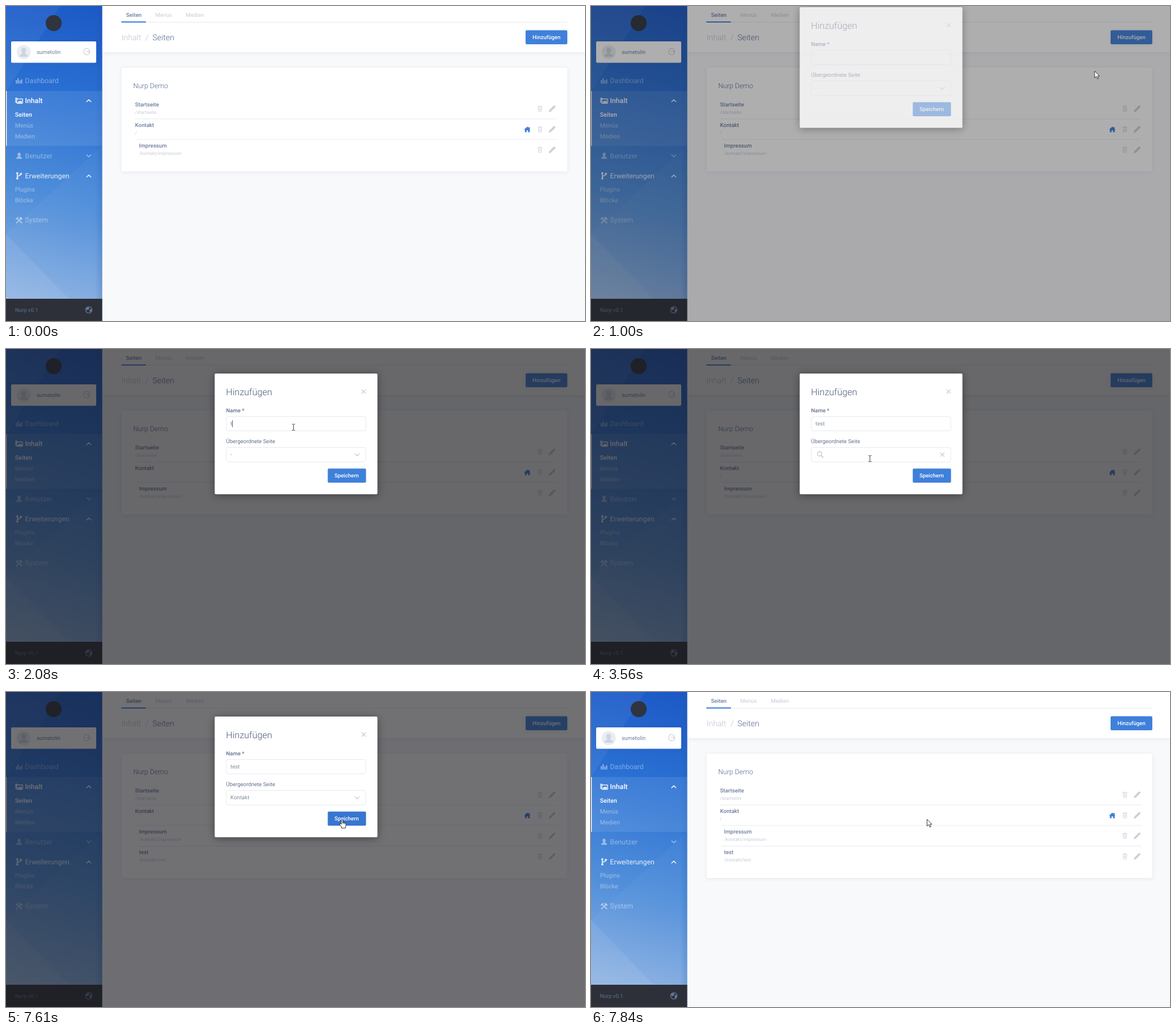
These frames come from a looping animation (1014x552 px, 8000 ms). An HTML page:

```html
<!DOCTYPE html>
<html lang="de">
<head>
<meta charset="utf-8">
<title>Seite hinzufügen</title>
<style>
  html, body { margin: 0; width: 100%; height: 100%; overflow: hidden; background: #f8f9fb; }
  svg { display: block; width: 1014px; height: 552px; }
  text { font-family: Roboto, "Noto Sans", sans-serif; text-rendering: geometricPrecision; white-space: pre; }
  .line { fill: none; stroke-linecap: round; stroke-linejoin: round; }
  .soft { filter: drop-shadow(0 1px 3px rgba(40, 60, 110, .1)); }
  .lift { filter: drop-shadow(0 2px 7px rgba(0, 0, 0, .4)); }
</style>
</head>
<body>
<svg id="stage" viewBox="0 0 1014 552" xmlns="http://www.w3.org/2000/svg"></svg>
<script>
const LOOP = 8000;
const BLUE = '#3f80da', HOVER = '#3876cf', INK = '#6c7e9f', PALE = '#c6ccd8', LINE = '#e7eaf0';

// ---- drawing helpers
const text = (x, y, size, fill, str, weight = 400, id = '') =>
  `<text ${id && `id="${id}"`} x="${x}" y="${y}" font-size="${size}" fill="${fill}" font-weight="${weight}">${str}</text>`;
const rect = (x, y, w, h, fill, r = 0, extra = '') =>
  `<rect x="${x}" y="${y}" width="${w}" height="${h}" rx="${r}" fill="${fill}" ${extra}/>`;
const line = (d, stroke, width = 1, extra = '') =>
  `<path class="line" d="${d}" stroke="${stroke}" stroke-width="${width}" ${extra}/>`;
const shape = (d, fill) => `<path d="${d}" fill="${fill}"/>`;
const at = (x, y, body, extra = '') => `<g transform="translate(${x} ${y})" ${extra}>${body}</g>`;
const chevron = (x, y, dir, stroke, w = 1.5) => at(x, y, line(`M-3.7 ${dir * -1.8}L0 ${dir * 1.8}L3.7 ${dir * -1.8}`, stroke, w));
const cross = (x, y) => at(x, y, line('M-3.4-3.4L3.4 3.4M3.4-3.4L-3.4 3.4', '#c0c6d1', 1.1));

// ---- icons, centred on 0,0
const person = fill => shape('M0-5.4C2-5.4 3-4 2.8-2C2.6-.4 1.9.5 1.5 1C1.6 2.3 5.3 2.4 5.3 5.4H-5.3C-5.3 2.4-1.6 2.3-1.5 1C-1.9.5-2.6-.4-2.8-2C-3-4-2-5.4 0-5.4Z', fill);
const bars = fill => shape('M-6-1h2.2v4.4h-2.2zM-2.9-4.6h2.2v8h-2.2zM.3-.6h2.2v4h-2.2zM3.4-2.4h2.2v5.8h-2.2zM-6 3.8h11.8v1h-11.8z', fill);
const photos = line('M-4-2.6V-4.6H-6V3H-4', '#fff', 1.2) + rect(-4, -3.2, 10, 7.8, 'none', .8, 'stroke="#fff" stroke-width="1.3"') +
  shape('M-3 3.6L0 0L1.6 1.6L3.2-.6L5.3 3.6Z', '#fff');
const branch = line('M-3.2-3.5V4M-3.2 2C-3 0 3-.2 3-3', '#e6eefb', 1.7) +
  [[-3.2, -4.4], [-3.2, 4.6], [3.2, -3.4]].map(([x, y]) => `<circle cx="${x}" cy="${y}" r="1.9" fill="#e6eefb"/>`).join('');
const tools = fill => line('M-4.4 4.6L3.6-3.4M4.6 4.6L-2-2', fill, 2.1) + line('M2-4.8L4.8-2M-5-2.2L-2-4.6', fill, 2.4);
const globe = '<circle r="5.6" fill="none" stroke="#64789b" stroke-width="1.2"/>' +
  shape('M-4-3.6L0-5L1.2-2.4L-1 0L-3 .4L-4.8-1ZM1.6-.6L4.6-2L5.2 1.4L2.6 4.8L1.4 2Z', '#64789b');
const exit = line('M4.9-2.8A5.6 5.6 0 1 0 4.9 2.8M-1.4 0H5.4M3.4-2L5.4 0L3.4 2', '#c9cfda', 1.1);
const trash = line('M-3.8-3.4H3.8M-1.4-3.6V-4.8H1.4V-3.6M-2.9-3.2L-2.6 4.8H2.6L2.9-3.2M-.9-1V2.8M.9-1V2.8', '#d3d7df', 1);
const pencil = shape('M-6 6L-5.2 2.6L2.6-5.2Q3.8-6.4 5-5.2L5.4-4.8Q6.4-3.8 5.2-2.6L-2.6 5.2Z', '#ccd1da');
const home = shape('M0-5L2.4-2.8V-4.4H4V-1.4L5.6 .2H4.3V5H1.3V1.6H-1.3V5H-4.3V.2H-5.6Z', BLUE);
const lens = '<circle cx="-1.2" cy="-1.2" r="3.7" fill="none" stroke="#b4bcca" stroke-width="1.1"/>' + line('M1.6 1.6L5 5', '#b4bcca', 1.2);

// ---- sidebar
const menu = [[135.3, 'Dashboard', .42, 400], [170.3, 'Inhalt', 1, 500], [266.6, 'Benutzer', .42, 400],
  [302.3, 'Erweiterungen', .87, 400], [379.4, 'System', .42, 400]];
const subs = [[193.7, 'Seiten', 1, 500], [212.8, 'Menüs', .45, 400], [231.8, 'Medien', .45, 400],
  [325.4, 'Plugins', .45, 400], [344.4, 'Blöcke', .45, 400]];
const white = a => `rgba(255,255,255,${a})`;
const entries = (list, x, size) => list.map(([y, s, a, w]) => text(x, y, size, white(a), s, w)).join('');

const sidebar = rect(0, 0, 168.5, 552, 'url(#sky)') +
  shape('M0 0H95L0 150Z', white(.05)) + shape('M0 400L168 245V513H0Z', white(.03)) +
  shape('M0 400L110 513H0Z', white(.07)) + rect(156, 0, 12.5, 513, 'url(#edge)') +
  '<circle cx="83.5" cy="30" r="14" fill="#2f343e"/>' +
  rect(9, 62, 149, 37.5, '#fff', 2, 'class="soft"') +
  '<circle cx="31" cy="80.7" r="12.3" fill="#e9ecf1"/>' + at(31, 81, person('#cbd2de'), 'opacity=".9"').replace('81)', '81) scale(1.45)') +
  text(53.7, 83.5, 9.5, INK, 'sumetolin') + at(141.5, 80, exit) +
  rect(0, 149, 168.5, 96, white(.09)) + rect(0, 149, 1.3, 96, '#fff') +
  entries(menu, 33.3, 12.2) + entries(subs, 15.7, 10.6) +
  at(23, 131, bars(white(.45))) + at(23, 166, photos) + at(23, 262.3, person(white(.45))) +
  at(23, 297.5, branch) + at(23, 375.5, tools(white(.45))) +
  chevron(145, 166, -1, '#fff') + chevron(145, 262.5, 1, white(.5)) + chevron(145, 298, -1, white(.9)) +
  rect(0, 513, 168.5, 39, '#2d3038') + text(15.7, 536, 9.5, '#5b6f92', 'Nurp v0.1') + at(145, 532.5, globe);

// ---- page
const row = (i, x, name, path, isHome) => {
  const y = 180 + i * 36;
  return (i ? rect(i > 1 ? 229 : 226, y - 18.6, (i > 1 ? 735 : 738), 1, LINE) : '') +
    text(x, y - 4, 9.6, INK, name, 500) + text(x, y + 9.4, 8.1, PALE, path) +
    (isHome ? at(913, y + .3, home) : '') + at(935, y, trash) + at(956.5, y, pencil);
};
const page = rect(168, 0, 846, 552, '#f8f9fb') +
  rect(168, -5, 846, 86, '#fff', 0, 'class="soft"') +
  rect(202, 28, 781, 1, LINE) + rect(202, 27, 43, 2, BLUE) +
  text(210.3, 18.6, 9.6, INK, 'Seiten', 500) + text(261.5, 18.6, 9.6, PALE, 'Menüs') + text(315, 18.6, 9.6, PALE, 'Medien') +
  text(202.3, 60, 14.1, '#bcc4d2', 'Inhalt', 300) + text(244.3, 60, 14.1, '#bcc4d2', '/', 300) + text(256.5, 60, 14.1, '#516891', 'Seiten', 300) +
  rect(910, 42.5, 73, 24.5, BLUE, 2, 'id="add" class="soft"') + text(922, 58, 9.5, '#fff', 'Hinzufügen', 500) +
  rect(202.5, 108, 780.5, 182, '#fff', 2, 'id="card" class="soft"') +
  text(222.8, 144.2, 12.2, '#516891', 'Nurp Demo', 300) +
  row(0, 226, 'Startseite', '/startseite') + row(1, 226, 'Kontakt', '/', true) +
  row(2, 233, 'Impressum', '/kontakt/impressum') + `<g id="added">${row(3, 233, 'test', '/kontakt/test')}</g>`;

// ---- dialog
const border = `stroke="${LINE}" stroke-width="1"`;
const dialog = rect(365.5, 43, 285, 211.5, '#fff', 2, 'class="lift"') + '<g id="content">' +
  text(385.3, 81, 16.1, '#4b5a78', 'Hinzufügen', 300) + cross(626.3, 74.5) +
  text(385.5, 111, 9.5, '#62718f', 'Name *', 500) + rect(385.8, 118.5, 244.2, 25, '#fff', 3, border) +
  text(393, 134.3, 9.6, '#838b99', '', 400, 'name') +
  text(385.5, 165.2, 9.5, '#62718f', 'Übergeordnete Seite') +
  rect(563.5, 209.5, 67, 24.7, BLUE, 2, 'id="save"') + text(575.2, 225.2, 9.5, '#fff', 'Speichern', 500) +
  rect(385.8, 172.5, 244.2, 25.5, '#fff', 3, border + ' id="box"') +
  `<g id="closed">${text(393, 188.3, 9.6, '#838b99', '-', 400, 'parent')}${chevron(615, 185.5, 1, '#bcc3cf', 1.1)}</g>` +
  `<g id="open">${at(401.5, 185, lens)}${cross(615.3, 185)}${text(413, 188.3, 9.7, '#838b99', '', 400, 'query')}</g>` +
  `<g id="results">${rect(393, 198, 230, 1, LINE)}${rect(393, 202, 230, 24, '#f3f6fb', 2, 'id="pick"')}${text(398.3, 217.5, 9.6, '#7088b2', 'Kontakt')}</g>` +
  rect(0, 0, 1, 12, '#4b5566', 0, 'id="caret"') + '</g>';

const cursors = {
  arrow: `<path d="M0 0V12L2.9 9.4L4.9 13.8L6.8 13L4.9 8.8H8.6Z" fill="#fff" stroke="#222" stroke-width=".9"/>`,
  hand: `<path d="M-1.3 1Q0-.8 1.3 1V5.4L6 6.4Q7.4 6.8 7.2 8.4L6.2 13V15.4H-1V13.2L-4.4 9Q-4.6 7-2.6 7.6L-1.3 8.8Z" fill="#fff" stroke="#222" stroke-width=".9"/>` +
    line('M1.3 5.4V8M3.4 6V8.2M5.4 6.4V8.6', '#222', .7),
  beam: line('M-2.4-5.2H-.7L0-4.6L.7-5.2H2.4M0-4.6V4.8M-2.4 5.4H-.7L0 4.8L.7 5.4H2.4', '#444', 1)
};

document.getElementById('stage').innerHTML = `<defs>
  <linearGradient id="sky" gradientUnits="userSpaceOnUse" x1="150" y1="0" x2="10" y2="520">
    <stop offset="0" stop-color="#1c59c6"/><stop offset=".3" stop-color="#2a70d3"/>
    <stop offset=".65" stop-color="#518fda"/><stop offset="1" stop-color="#90b3e2"/></linearGradient>
  <linearGradient id="edge"><stop offset="0" stop-color="#1c4f9c" stop-opacity="0"/><stop offset="1" stop-color="#1c4f9c" stop-opacity=".2"/></linearGradient>
  </defs>${page}${sidebar}${rect(0, 0, 1014, 552, '#17181c', 0, 'id="shade"')}<g id="dialog">${dialog}</g><g id="mouse">` +
  Object.entries(cursors).map(([k, v]) => `<g id="${k}">${v}</g>`).join('') + '</g>';

// ---- timing: the picture changes only at these moments
const spread = (a, b, n) => Array.from({ length: n }, (_, i) => Math.round((a + (b - a) * i / (n - 1)) / 10) * 10);
const steps = [0, ...spread(70, 830, 11), 910, ...spread(1000, 1610, 9), 1780, 2080, 2170, 2400, ...spread(2580, 2870, 5),
  ...spread(3030, 3260, 4), 3410, 3560, 3730, 3880, 4280, 4750, 5070, 5220, 5450, 6000, 6300, 6370,
  ...spread(6540, 7240, 10), 7610, 7690, 7770, 7840];

const shadeKeys = [[830, 0], [910, .1], [1000, .35], [1080, .52], [1160, .61], [1240, .65], [7600, .65], [7610, .61], [7690, .38], [7770, .14], [7840, 0]];
const fadeKeys = [[830, 0], [910, .25], [1000, .8], [1080, 1], [7610, 1], [7690, .65], [7770, .2], [7840, 0]];
const inkKeys = [[910, .3], [1000, .52], [1160, .92], [1240, 1]];
const slideKeys = [[910, -60], [1000, -41], [1080, -24], [1240, -6], [1400, 0], [7610, 0], [7690, -14], [7840, -60]];
const mouseKeys = [[70, 985, 392], [300, 978, 240], [530, 958, 110], [680, 946, 66], [750, 943, 58], [910, 943, 58],
  [1000, 882, 114], [1240, 650, 150], [1500, 515, 140], [1610, 503.5, 137], [2580, 503.5, 137], [2720, 496, 160],
  [2870, 486, 186], [3260, 486, 204], [3410, 487, 198], [3560, 488.5, 192], [3870, 488.5, 192], [3880, 489.5, 192],
  [6230, 489.5, 192], [6300, 489, 203], [6370, 488, 208], [6620, 488, 208], [6850, 530, 214], [7090, 584, 223], [7160, 588.5, 223]];
const kinds = [[0, 'arrow'], [750, 'hand'], [1000, 'arrow'], [1480, 'beam'], [2720, 'arrow'], [2800, 'hand'],
  [3410, 'beam'], [6300, 'hand'], [6700, 'arrow'], [7010, 'hand'], [7840, 'arrow']];
const names = [[0, ''], [2080, 't'], [2170, 'te'], [2400, 'tes'], [2580, 'test']];
const queries = [[0, ''], [5070, 'k'], [5220, 'ko'], [5450, 'kon']];
const carets = [[0, 0], [1780, 1], [3030, 0], [3730, 1], [4280, 0], [4750, 1], [6000, 0]];

const last = (keys, t) => keys.filter(k => k[0] <= t).pop()[1];
const track = (keys, t, c = 1) => {
  const i = keys.findIndex(k => k[0] > t);
  if (i < 0) return keys[keys.length - 1][c];
  if (!i) return keys[0][c];
  const a = keys[i - 1], b = keys[i];
  return a[c] + (b[c] - a[c]) * (t - a[0]) / (b[0] - a[0]);
};

const $ = id => document.getElementById(id);
const show = (id, on) => $(id).setAttribute('display', on ? 'inline' : 'none');
const set = (id, attr, v) => $(id).setAttribute(attr, v);

function draw(time) {
  const t = steps.filter(s => s <= time).pop();
  const open = t >= 3110 && t < 6620, listed = open && t >= 5070, saved = t >= 7610;

  set('shade', 'opacity', track(shadeKeys, t));
  set('dialog', 'opacity', track(fadeKeys, t));
  set('dialog', 'transform', `translate(0 ${track(slideKeys, t)})`);
  show('dialog', t >= 910 && t < 7840);
  set('content', 'opacity', track(inkKeys, t));

  set('add', 'fill', t >= 680 && t < 1000 ? HOVER : BLUE);
  set('save', 'fill', t >= 7010 ? HOVER : BLUE);
  set('card', 'height', saved ? 218 : 182);
  show('added', saved);

  $('name').textContent = last(names, t);
  $('query').textContent = last(queries, t);
  $('parent').textContent = t >= 6620 ? 'Kontakt' : '-';
  show('open', open);
  show('closed', !open);
  show('results', listed);
  show('pick', t >= 6300);
  set('box', 'height', listed ? 57.5 : 25.5);

  const field = $(t < 3110 ? 'name' : 'query');
  show('caret', last(carets, t));
  set('caret', 'x', (t < 3110 ? 393 : 413) + (field.textContent ? field.getComputedTextLength() : 0));
  set('caret', 'y', t < 3110 ? 125 : 179);

  show('mouse', t >= 70);
  set('mouse', 'transform', `translate(${track(mouseKeys, t)} ${track(mouseKeys, t, 2)})`);
  for (const k in cursors) show(k, k === last(kinds, t));
}

const start = performance.now();
function tick() {
  draw((performance.now() - start) % LOOP);
  requestAnimationFrame(tick);
}
tick();
</script>
</body>
</html>
```
